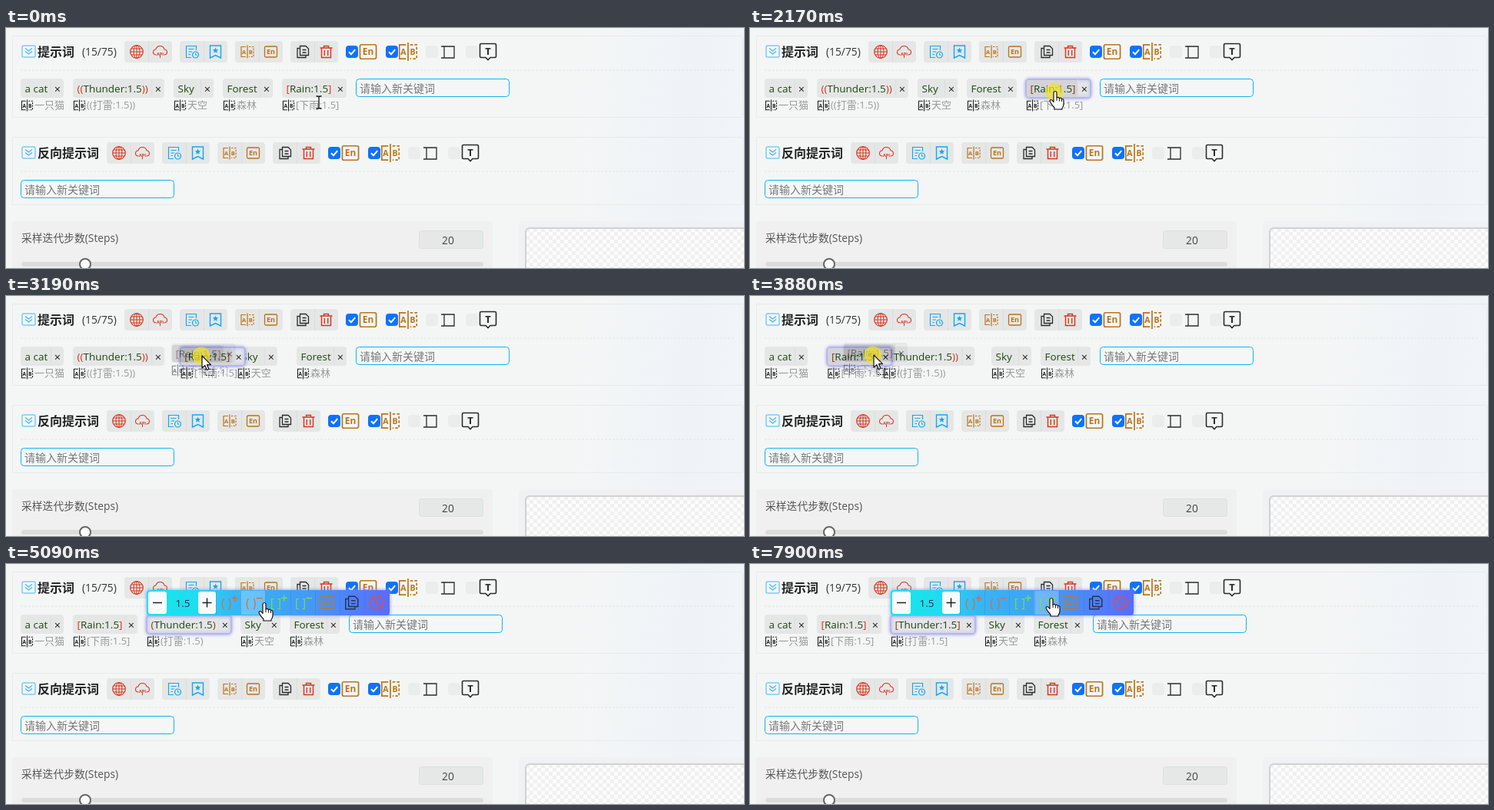
An HTML page with a canvas for the animation above (8 s loop, 960 by 313 pixels).

```html
<!DOCTYPE html>
<html lang="zh">
<head>
<meta charset="utf-8">
<style>
html, body { margin: 0; width: 100%; height: 100%; overflow: hidden; background: #f4f6f6; }
canvas { display: block; width: 960px; height: 313px; }
</style>
</head>
<body>
<canvas id="stage" width="960" height="313"></canvas>
<script>
const W = 960, H = 313, LOOP = 8000;
const stage = document.getElementById('stage');
let g = stage.getContext('2d');

const LATIN = '"Open Sans", "Noto Sans CJK SC", "Noto Sans CJK", sans-serif';
const CJK = '"Noto Sans CJK SC", "Noto Sans CJK", sans-serif';
const RED = '#d9351c', BLUE = '#12a9f0', BROWN = '#b9741b', DARK = '#2b2b2b', GREEN = '#1f4512';

// ---------- drawing helpers ----------
function text(s, x, y, size, color, o = {}) {
  g.font = `${o.weight || 400} ${size}px ${o.font || LATIN}`;
  g.textAlign = o.align || 'left';
  g.textBaseline = 'alphabetic';
  g.fillStyle = color;
  g.fillText(s, x, y);
  return g.measureText(s).width;
}

function box(x, y, w, h, r, fill, stroke, lw = 1) {
  g.beginPath();
  g.roundRect(x, y, w, h, r);
  if (fill) { g.fillStyle = fill; g.fill(); }
  if (stroke) { g.strokeStyle = stroke; g.lineWidth = lw; g.stroke(); }
}

function line(d, color, lw = 1.2, dash = []) {
  g.strokeStyle = color;
  g.lineWidth = lw;
  g.setLineDash(dash);
  g.stroke(new Path2D(d));
  g.setLineDash([]);
}

function ring(x, y, rx, ry, color, lw = 1.2) {
  g.beginPath();
  g.ellipse(x, y, rx, ry, 0, 0, 7);
  g.strokeStyle = color;
  g.lineWidth = lw;
  g.stroke();
}

const label = (s, x, y, size, c) => text(s, x, y, size, c, { weight: 700, align: 'center' });

const icons = {
  globe(c) {
    ring(0, 0, 8.3, 8.3, c);
    ring(0, 0, 4, 8.3, c, 1);
    line('M-8 0H8M0 -8V8M-7 -4H7M-7 4H7', c, 1);
  },
  cloud(c) {
    line('M-5 4Q-9 4 -9 .5Q-9 -2.5 -5.5 -3.2Q-4.5 -7.5 0 -7.5Q4.5 -7.5 5.5 -3.2Q9 -2.5 9 .5Q9 4 5 4', c, 1.1);
    label('API', 0, 4.5, 5.5, c);
    line('M0 5V8', c, 1);
  },
  history(c) {
    line('M5.5 -2V-7.5H-7.5V7.5H-1M-4.5 -3.5H2.5M-4.5 0H0M-4.5 3.5H-2', c);
    ring(4.5, 4, 4, 4, c);
    line('M4.5 1.8V4.2H6.5', c, 1);
  },
  mark(c) {
    line('M-7 -8H7V8L0 4.5L-7 8Z', c, 1.4);
    g.beginPath();
    for (let i = 0; i < 10; i++) {
      const r = i % 2 ? 1.8 : 3.9, a = i * Math.PI / 5;
      g.lineTo(Math.sin(a) * r, -1.5 - Math.cos(a) * r);
    }
    g.fillStyle = c;
    g.fill();
  },
  ab(c) {
    line('M-2 -6.5H-8V6.5H-2M0 -8.5V8.5', c, 1.2);
    line('M2 -6.5H8V6.5H2', c, 1.2, [2.4, 1.6]);
    label('A', -4.3, 3, 7.5, c);
    label('B', 4.3, 3, 7.5, c);
  },
  en(c) {
    box(-8, -7, 16, 14, 1.5, null, c, 1.3);
    label('En', 0, 3.2, 9, c);
  },
  copy(c) {
    line('M-3.5 -7.5H4L7.5 -4V4.5H-3.5ZM-4 -4.5H-7V7.5H4V5M-.5 -2.5H4.5M-.5 1H4.5', c, 1.3);
  },
  trash(c) {
    line('M-8 -5H8M-3 -5V-7.5H3V-5M-6 -5V7.5H6V-5M-2.2 -2V5M2.2 -2V5', c, 1.4);
  },
  ban(c) {
    ring(0, 0, 8, 8, c, 1.4);
    line('M-5.6 -5.6L5.6 5.6', c, 1.4);
  },
  fold(c) {
    box(-8.5, -7.5, 17, 15, 1, null, c, 1);
    line('M-4.5 -4L0 -.5L4.5 -4M-4.5 0L0 3.5L4.5 0', c, 1.2);
  },
  caret(c) {
    line('M-8.5 -7.5H8.5V7.5H-8.5M-4.5 -7.5V7.5', c, 1.3);
  },
  bubble(c) {
    line('M-9 -10.5H9Q10.5 -10.5 10.5 -9V6Q10.5 7.5 9 7.5H3L0 10.5L-3 7.5H-9Q-10.5 7.5 -10.5 6V-9Q-10.5 -10.5 -9 -10.5Z', c, 1.6);
    label('T', 0, 3.5, 13, c);
  }
};

function icon(name, x, y, color, k = 1) {
  g.save();
  g.translate(x, y);
  g.scale(k, k);
  icons[name](color);
  g.restore();
}

// ---------- fixed parts ----------
function check(x, y, on) {
  box(x, y, 16, 16, 4, on ? '#0d73fb' : '#ebeded');
  if (!on) return;
  g.save();
  g.translate(x, y);
  line('M4 8.3L7 11.2L12.2 5.2', '#fff', 2);
  g.restore();
}

function toolbar(x, y) {
  const sets = [
    ['globe', RED, 'cloud', RED], ['history', BLUE, 'mark', BLUE],
    ['ab', BROWN, 'en', BROWN], ['copy', DARK, 'trash', RED]
  ];
  sets.forEach(([a, ca, b, cb], i) => {
    const l = x + i * 72;
    box(l, y - 14, 62, 28, 4, '#e5e7e7');
    g.fillStyle = '#dcdede';
    g.fillRect(l + 31, y - 14, 1, 28);
    icon(a, l + 16, y, ca);
    icon(b, l + 46.5, y, cb);
  });
  check(x + 288, y - 8, true);
  icon('en', x + 317, y, BROWN, 1.32);
  check(x + 340, y - 8, true);
  icon('ab', x + 369, y, BROWN, 1.4);
  check(x + 392, y - 8, false);
  icon('caret', x + 420.5, y + .5, DARK);
  check(x + 444, y - 8, false);
  icon('bubble', x + 473, y, DARK);
}

function field(x, y) {
  box(x + .5, y + .5, 199, 23, 4, '#f5f7f7', '#12b2f2');
  text('请输入新关键词', x + 5, y + 18, 14, '#777', { font: CJK });
}

function panel(y, h, title, toolX) {
  box(8.5, y + .5, 950, h, 1, null, '#e8eaeb');
  line(`M19 ${y + 45}H947`, '#e3e6e6', 1, [3, 2]);
  icon('fold', 29.5, y + 20.5, '#3db7f2');
  text(title, 41, y + 27, 16, '#222', { weight: 700, font: CJK });
  toolbar(toolX, y + 21);
}

function drawStatic() {
  const bg = g.createLinearGradient(0, 0, W, 60);
  bg.addColorStop(0, '#f4f6f6');
  bg.addColorStop(.78, '#f4f6f6');
  bg.addColorStop(.93, '#eff3f8');
  bg.addColorStop(1, '#f1f4f8');
  g.fillStyle = bg;
  g.fillRect(0, 0, W, H);

  panel(10, 106, '提示词', 154);
  panel(142, 88, '反向提示词', 131);
  field(19, 198);

  box(8, 252, 625, 80, 4, '#f0f0f0');
  text('采样迭代步数(Steps)', 20, 279, 13.8, '#555');
  box(537.5, 264.5, 83, 23, 3, '#e6e7e7', '#dedfdf');
  text('20', 575, 282, 13.8, '#444', { align: 'center' });
  box(20, 305, 601, 6, 3, '#dcdcdc');
  g.beginPath();
  g.arc(103, 308, 7, 0, 7);
  g.fillStyle = '#fff';
  g.fill();
  ring(103, 308, 7, 7, '#666', 2);

  box(667, 252, 300, 80, 4, '#f0f1f2');
  g.save();
  box(676, 261, 300, 80, 5, '#fcfcfc');
  g.clip();
  g.fillStyle = '#f0f0f0';
  for (let y = 0; y < 11; y++)
    for (let x = y % 2; x < 58; x += 2) g.fillRect(676 + x * 5, 261 + y * 5, 5, 5);
  g.restore();
  box(676, 261, 300, 80, 5, null, '#d0d1d2', 2);
}

const back = document.createElement('canvas');
back.width = W;
back.height = H;
function bake() {
  const live = g;
  g = back.getContext('2d');
  drawStatic();
  g = live;
}

// ---------- timeline ----------
const path = [ // time, x, y of the pointer
  [0, 407, 97], [60, 407, 92], [130, 406, 80], [330, 406, 80], [620, 431, 50], [850, 400, 42],
  [1070, 374, 62], [1140, 372, 66], [1450, 424, 62], [1650, 388, 50], [1890, 396, 82],
  [2310, 397, 84], [2750, 318, 82], [3190, 255, 78], [3540, 222, 78], [3740, 178, 78],
  [3880, 161, 77], [4080, 144, 78], [4290, 205, 80], [4420, 240, 76], [4720, 326, 52],
  [4880, 336, 51], [5100, 336, 51], [5160, 350, 50], [5370, 368, 49], [6100, 368, 49],
  [6101, 367, 48], [6430, 367, 48], [6431, 368, 48], [7230, 368, 48], [7231, 369, 48],
  [7490, 369, 48], [7640, 392, 45], [8000, 392, 45]
];
const presses = [[2060, 4080], [4880, 5020], [5580, 5700], [6760, 6890], [7690, 7830]];
const orders = [[0, 'CTSFR'], [2750, 'CTSRF'], [3065, 'CTRSF'], [3745, 'CRTSF']];
const wraps = [[0, '((', '))'], [4950, '(', ')'], [5650, '[', ']'], [6830, '[[', ']]'], [7760, '[', ']']];
const latest = (list, t) => list.filter(e => e[0] <= t).pop();

function pointer(t) {
  let i = 1;
  while (path[i][0] < t) i++;
  const [t0, x0, y0] = path[i - 1], [t1, x1, y1] = path[i];
  const k = (t - t0) / (t1 - t0);
  return { x: x0 + (x1 - x0) * k, y: y0 + (y1 - y0) * k };
}

function tokensAt(t) {
  const [, open, close] = latest(wraps, t);
  return {
    C: { s: 'a cat', zh: '一只猫', w: 56 },
    T: { s: 'Thunder:1.5', zh: '打雷:1.5', open, close, w: 101 + 9 * open.length },
    S: { s: 'Sky', zh: '天空', w: 52 },
    F: { s: 'Forest', zh: '森林', w: 65 },
    R: { s: 'Rain:1.5', zh: '下雨:1.5', open: '[', close: ']', w: 84 }
  };
}

function place(order, tokens) {
  const at = {};
  let x = 19;
  for (const id of order) { at[id] = x; x += tokens[id].w + 12; }
  at.end = x;
  return at;
}

// ---------- moving parts ----------
function token(tk, x, y, active, dark) {
  const { s, zh, w, open = '', close = '' } = tk;
  if (active) {
    g.save();
    g.shadowColor = '#9a9af0';
    g.shadowBlur = 4;
    box(x, y, w, 24, 4, '#e4e5e8', '#b3b3e8', 1.5);
    g.restore();
  } else box(x, y - 1, w, 25, 4, '#e5e7e6');
  if (dark) box(x + 1, y + 1, w - 18, 22, 3, '#d4d4d8');
  g.fillStyle = '#dddfde';
  g.fillRect(x + w - 17, y, 1, 23);
  const mark = open === '(' || (active && open[0] === '[') ? '#8a3c14' : RED;
  let tx = x + 5.5;
  tx += text(open, tx, y + 17, 13.5, mark);
  tx += text(s, tx, y + 17, 13.5, GREEN);
  text(close, tx, y + 17, 13.5, mark);
  text('×', x + w - 8, y + 18, 14.5, '#222', { align: 'center' });
  icon('ab', x + 8.5, y + 34, '#1c1c1c', .88);
  text(open + zh + close, x + 18, y + 38, 13, '#989a9a');
}

function popup(x, p, down) {
  const y = 34;
  const fill = g.createLinearGradient(x, 0, x + 316, 0);
  fill.addColorStop(0, '#16e6ea');
  fill.addColorStop(.2, '#1fdcf0');
  fill.addColorStop(.36, '#36b7f3');
  fill.addColorStop(.65, '#429cf3');
  fill.addColorStop(1, '#5b6bfb');
  g.save();
  g.shadowColor = '#8c8cf0';
  g.shadowBlur = 5;
  box(x, y, 316, 33, 4, fill);
  g.restore();
  box(x + 2, y + 2, 24, 29, 3, '#f8fbfb');
  box(x + 67, y + 2, 23, 29, 3, '#f8fbfb');
  line(`M${x + 8} 50.5h12M${x + 72.5} 50.5h12M${x + 78.5} 44.5v12`, '#222', 1.5);
  text('1.5', x + 47, y + 22, 13.5, '#234', { align: 'center' });

  const over = p.y > y && p.y < y + 33 ? Math.floor((p.x - x - 90) / 32.2) : -1;
  for (let i = 0; i < 7; i++) {
    const l = x + 90 + i * 32.2;
    if (i === over && !down) {
      g.fillStyle = 'rgba(255,255,255,.24)';
      g.fillRect(l, y + 1, 32, 31);
    }
    g.fillStyle = 'rgba(70,110,220,.3)';
    g.fillRect(Math.round(l), y + 1, 1, 31);
    const cx = l + 16.5;
    if (i < 4) {
      const c = i < 2 ? '#dc6a4c' : '#72dc5e';
      text(i < 2 ? '( )' : '[ ]', cx - 3, y + 23, 15.5, c, { align: 'center' });
      line(`M${cx + 4} 44.5h8` + (i % 2 ? '' : `M${cx + 8} 40.5v8`), c, 1.5);
    }
  }
  icon('en', x + 234, 50.5, '#b07c45', 1.1);
  icon('copy', x + 266.5, 50.5, '#273252', 1.1);
  icon('ban', x + 299, 50.5, '#d6505c', 1.1);
}

const HAND = new Path2D('M-2 1Q0 -2 2 1V8Q3.8 6.3 5.4 8.6Q7.4 7.4 8.4 9.6Q11 9 11 12V16Q11 19 9 21.5V23H-1V21Q-4 18 -6.5 13.5Q-7.6 11 -5.5 10.5Q-4 10.5 -2 13.5Z');
const ARROW = new Path2D('M0 0V16L3.8 12.6L6.4 18.5L9 17.4L6.5 11.7H11.5Z');

function cursor(kind, p, down) {
  if (down) {
    g.beginPath();
    g.arc(p.x - 1, p.y, 11.5, 0, 7);
    g.fillStyle = 'rgba(242,226,38,.72)';
    g.fill();
  }
  g.save();
  g.translate(Math.round(p.x), Math.round(p.y));
  if (kind === 'beam') {
    line('M-3.5 -8H-1L0 -7L1 -8H3.5M0 -7V7M-3.5 8H-1L0 7L1 8H3.5', '#111', 1.3);
  } else {
    if (kind === 'arrow') line('M4 17.5H15V25.5H4Z', '#333', 1, [2, 1]);
    const shape = kind === 'hand' ? HAND : ARROW;
    g.fillStyle = '#fff';
    g.fill(shape);
    g.strokeStyle = '#111';
    g.lineWidth = 1.2;
    g.lineJoin = 'round';
    g.stroke(shape);
    if (kind === 'hand') line('M2 8V12M5.4 9V12.5M8.4 10V13', '#111', 1);
  }
  g.restore();
}

function draw(t) {
  const p = pointer(t);
  const down = presses.some(([a, b]) => t >= a && t < b);
  const dragging = t >= 2310 && t < 4080;
  const tokens = tokensAt(t);

  const now = latest(orders, t);
  const prev = orders[Math.max(0, orders.indexOf(now) - 1)];
  const from = place(prev[1], tokens), to = place(now[1], tokens);
  const k = Math.min(1, (t - now[0]) / 200), ease = 1 - (1 - k) ** 2;

  const owner = t < 60 ? '' : t < 4080 ? 'R' : t >= 4290 ? 'T' : '';
  const open = owner && (t < 2060 || t >= 4290);

  g.drawImage(back, 0, 0);
  text(t < 5650 ? '(15/75)' : '(19/75)', 99, 36, 13.8, '#333');
  // the active token lies on top of its neighbours
  const stack = [...now[1]].sort((a, b) => (a === owner) - (b === owner));
  for (const id of stack) {
    const x = from[id] + (to[id] - from[id]) * ease;
    const dark = id === owner && (dragging || p.y > 67);
    token(tokens[id], x, 67, id === owner, dark);
  }
  field(to.end, 66);

  if (dragging) {
    g.save();
    g.globalAlpha = .55;
    g.globalCompositeOperation = 'multiply';
    token(tokens.R, p.x - 40, p.y - 15, false, true);
    g.restore();
  }
  if (open) popup(to[owner], p, down);
  cursor(t < 60 ? 'beam' : dragging ? 'arrow' : 'hand', p, down);
}

bake();
const start = performance.now();
function tick() {
  draw((performance.now() - start) % LOOP);
  requestAnimationFrame(tick);
}
tick();
</script>
</body>
</html>
```
